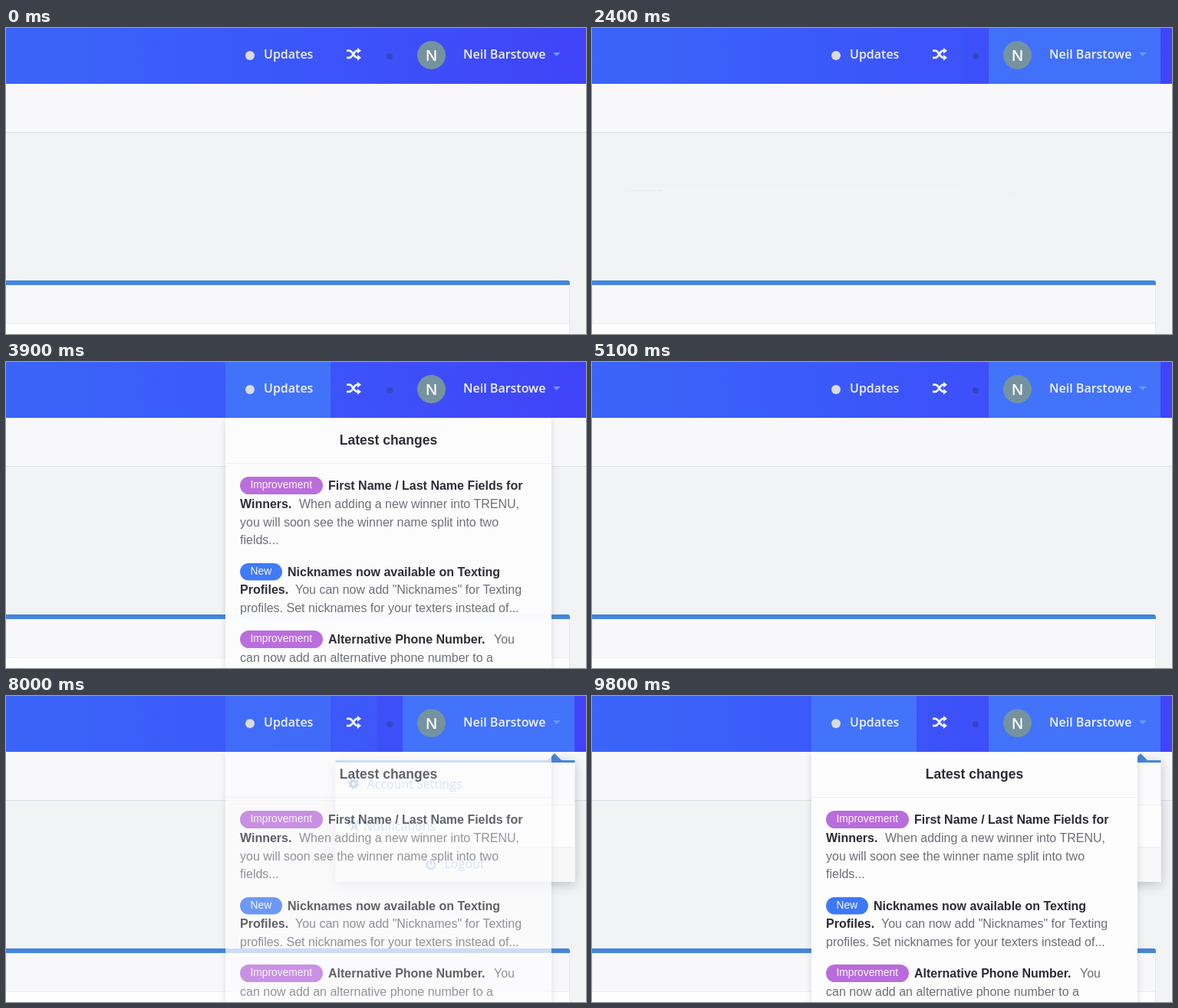
An HTML page for the animation above (10000 ms loop, 756 px wide and 400 px high).

```html
<!DOCTYPE html>
<html lang="en">
<head>
<meta charset="utf-8">
<title>Header menus</title>
<style>
html, body { margin: 0; width: 100%; height: 100%; overflow: hidden; background: #f2f3f4; }
#stage { position: relative; width: 756px; height: 400px; overflow: hidden; }
svg { position: absolute; left: 0; top: 0; width: 756px; height: 400px; overflow: visible; }
text { font: 16px "Open Sans", sans-serif; white-space: pre; }
.semi { font-weight: 600; }
.nav { font-weight: 600; fill: #f1f3ff; }
.hi { fill: #4273fa; }
.blue { fill: #4486da; }
.card { fill: #fbfbfd; filter: drop-shadow(0 3px 8px rgba(90, 90, 110, .36)); }
.foot { fill: #f8f8f9; }
.rule { stroke: #efeff0; }
.item { fill: #6f9bdc; }
.line { fill: none; stroke: #5289da; stroke-width: 2; }
#account { transform-origin: 585.5px 163.5px; }
#markets { transform-origin: 264.8px 211px; }
#panel text { font-family: "Liberation Sans", Arial, sans-serif; fill: #6d6e76; }
#panel .b { font-weight: bold; fill: #2b2c33; }
#panel .tag { font-size: 13.8px; fill: #fcf8ff; }
</style>
</head>
<body>
<div id="stage">
  <svg viewBox="0 0 756 400">
    <defs>
      <linearGradient id="bar">
        <stop offset="0" stop-color="#3a65f8"/>
        <stop offset=".45" stop-color="#3b58fa"/>
        <stop offset="1" stop-color="#4043f8"/>
      </linearGradient>
    </defs>
    <rect width="756" height="400" fill="#f2f3f4"/>
    <rect y="73" width="756" height="63" fill="#f8f8fb"/>
    <path d="M0 136.5H756" stroke="#dcdde8"/>
    <path d="M0 336H734.5V400H0z" fill="#f8f8fb" stroke="#e8e8ec"/>
    <rect y="387" width="734" height="13" fill="#fefefe"/>
    <path d="M0 386.5H734" stroke="#eeeef3"/>
    <path class="blue" d="M0 330H732Q735 330 735 333V336H0z"/>
    <rect width="756" height="73" fill="url(#bar)"/>
    <rect id="hiUpdates" class="hi" x="286" width="137" height="73"/>
    <rect id="hiShuffle" class="hi" x="423" width="60" height="73"/>
    <rect id="hiUser" class="hi" x="517" width="224" height="73"/>
    <circle cx="318" cy="36" r="6" fill="#dadbe0"/>
    <text class="nav" x="336" y="40">Updates</text>
    <g fill="none" stroke="#f1f3ff" stroke-width="2.8">
      <path d="M444 29.7H447.5C452 29.7 453 38.8 458 38.8H459M444 38.8H447.5C452 38.8 453 29.7 458 29.7H459"/>
      <path d="M458 25.8L463 29.7L458 33.6zM458 34.9L463 38.8L458 42.7z" fill="#f1f3ff" stroke="none"/>
    </g>
    <circle cx="500" cy="37" r="4" fill="#3546c4"/>
    <circle cx="554.5" cy="35.5" r="18.5" fill="#75939f"/>
    <text x="554.5" y="42.5" text-anchor="middle" fill="#fcfdfd" style="font-size:20px;font-weight:600">N</text>
    <text class="nav" x="596" y="40">Neil Barstowe</text>
    <path d="M713 32H722.5L717.8 37z" fill="#7099fa"/>
  </svg>

  <svg id="markets" viewBox="0 0 756 400">
    <path class="blue" d="M446.5 85L456.7 75L467 85z"/>
    <rect class="card" x="46" y="84" width="437.5" height="254"/>
    <rect class="blue" x="46" y="84" width="437.5" height="3"/>
    <text class="semi" x="63" y="120" fill="#67676f">Switch Markets</text>
    <path class="rule" d="M46 146.5H483.5"/>
    <rect x="57.5" y="156.5" width="415" height="47.5" fill="#fefefe" stroke="#e3e4ea"/>
    <text x="72.5" y="185.5" fill="#7f7f88">Search Markets</text>
    <rect x="46" y="214" width="437.5" height="75" fill="#fefefe"/>
    <path d="M46 214.5H483.5" stroke="#ebebef" stroke-width="2"/>
    <g class="blue">
      <path d="M67 255L83.5 241L100 255V271H87.5V260H79.5V271H67z"/>
      <path d="M61 253L83.5 234L92 241V236H98V246L106 253L103.5 256L83.5 239.3L63.5 256z"/>
    </g>
    <text class="semi" x="118.5" y="241" fill="#5c5b66">Dallas</text>
    <text class="semi" x="119.3" y="269.5" fill="#44c398">Login Now</text>
    <rect class="foot" x="46" y="289" width="437.5" height="49"/>
    <text x="264.8" y="318.5" text-anchor="middle" fill="#6a99e4">Dashboard</text>
    <path d="M46 337.5H483.5" stroke="#a5a8ae"/>
  </svg>

  <svg id="account" viewBox="0 0 756 400">
    <path class="blue" d="M705 85L715 75L725 85z"/>
    <rect class="card" x="429.5" y="84" width="312" height="159"/>
    <rect class="blue" x="429.5" y="84" width="312" height="3"/>
    <path class="rule" d="M429.5 142.5H741.5"/>
    <rect x="429.5" y="143" width="312" height="54" fill="#fdfdfe"/>
    <rect class="foot" x="429.5" y="197" width="312" height="46"/>
    <path class="rule" d="M429.5 197.5H741.5"/>
    <circle class="line" cx="453" cy="114.5" r="3.9" style="stroke-width:3.4"/>
    <circle class="line" cx="453" cy="114.5" r="6.2" pathLength="16" stroke-dasharray="1 1"/>
    <text class="item" x="470.5" y="120.5">Account Settings</text>
    <path class="line" style="stroke-width:1.6" d="M450 176L454 164L458 176M451.5 172H456.5M450.5 162.5Q448.8 165 450.5 167.5M457.5 162.5Q459.2 165 457.5 167.5M448 160.5Q445 165 448 169.5M460 160.5Q463 165 460 169.5"/>
    <text class="item" x="466" y="175.5">Notifications</text>
    <path class="line" d="M550.8 216A5.5 5.5 0 1 0 557.2 216M554 213V220.5"/>
    <text class="item" x="571.5" y="225">Logout</text>
  </svg>

  <svg id="panel" viewBox="0 0 756 400">
    <rect x="286" y="73" width="425" height="340" fill="#fdfdfe" style="filter:drop-shadow(0 3px 5px rgba(90,90,110,.22))"/>
    <text class="b" x="498.5" y="108" text-anchor="middle" style="font-size:17.5px">Latest changes</text>
    <path class="rule" d="M286 132.5H711"/>
    <rect x="305" y="150" width="108" height="23" rx="11.5" fill="#b96cdc"/>
    <text class="tag" x="318.5" y="165">Improvement</text>
    <text class="b" x="420" y="167">First Name / Last Name Fields for</text>
    <text class="b" x="305" y="191">Winners.</text>
    <text x="382" y="191">When adding a new winner into TRENU,</text>
    <text x="305" y="215">you will soon see the winner name split into two</text>
    <text x="305" y="238">fields...</text>
    <rect x="305" y="263" width="55" height="22.5" rx="11.25" fill="#3d78f8"/>
    <text class="tag" x="318.5" y="278">New</text>
    <text class="b" x="367" y="280">Nicknames now available on Texting</text>
    <text class="b" x="305" y="303">Profiles.</text>
    <text x="377" y="303">You can now add "Nicknames" for Texting</text>
    <text x="305" y="327">profiles. Set nicknames for your texters instead of...</text>
    <rect x="305" y="351" width="108" height="23" rx="11.5" fill="#b96cdc"/>
    <text class="tag" x="318.5" y="366">Improvement</text>
    <text class="b" x="420" y="368">Alternative Phone Number.</text>
    <text x="636" y="368">You</text>
    <text x="305" y="392">can now add an alternative phone number to a</text>
  </svg>
</div>

<script>
const LOOP = 10000, STEP = 100, FLIP = 750, FADE_IN = 430, FADE_OUT = 370, END = LOOP * 2;
const el = id => document.getElementById(id);
const clamp = v => Math.max(0, Math.min(1, v));

// [fade in starts, fade out starts]
const updates = [[3550, 4530], [5860, 7930], [9360, END]];
const fades = {
  hiUser: [[640, 2370], [4530, 8190], [8390, END]],
  hiShuffle: [[2370, 3030], [7930, 8985]],
  hiUpdates: updates,
  panel: updates
};

// [flip starts, hidden at]; opening one menu closes the other
const flips = {
  account: [[1185, 2370], [5185, 8190], [8985, END]],
  markets: [[2370, 3030], [8190, 8985]]
};

function bezier(x1, y1, x2, y2) {
  const at = (a, b, s) => 3 * a * s * (1 - s) ** 2 + 3 * b * s * s * (1 - s) + s ** 3;
  return x => {
    let lo = 0, hi = 1;
    for (let i = 0; i < 24; i++) {
      const mid = (lo + hi) / 2;
      if (at(x1, x2, mid) < x) lo = mid; else hi = mid;
    }
    return at(y1, y2, (lo + hi) / 2);
  };
}
const easeIn = bezier(.42, 0, 1, 1), ease = bezier(.25, .1, .25, 1);

const swing = [[0, 90, easeIn], [.4, -20, easeIn], [.6, 10, ease], [.8, -5, ease], [1, 0]];
function angle(p) {
  if (p >= 1) return 0;
  const i = swing.findIndex((k, n) => p < swing[n + 1][0]);
  const [a, from, curve] = swing[i], [b, to] = swing[i + 1];
  return from + (to - from) * curve((p - a) / (b - a));
}

function level(t, spans) {
  return Math.max(...spans.map(([on, off]) =>
    Math.min(ease(clamp((t - on) / FADE_IN)), 1 - ease(clamp((t - off) / FADE_OUT)))));
}

function draw(t) {
  for (const id in fades) el(id).style.opacity = level(t, fades[id]);
  for (const id in flips) {
    const span = flips[id].find(([a, b]) => t >= a && t < b);
    const style = el(id).style;
    style.visibility = span ? "visible" : "hidden";
    if (!span) continue;
    const p = clamp((t - span[0]) / FLIP), deg = angle(p);
    style.opacity = clamp(p / .5);
    style.transform = deg ? `perspective(500px) rotateX(${deg}deg)` : "none";
  }
}

const begin = performance.now();
function tick() {
  const t = (performance.now() - begin) % LOOP;
  draw(Math.floor(t / STEP) * STEP);
  requestAnimationFrame(tick);
}
tick();
</script>
</body>
</html>
```
